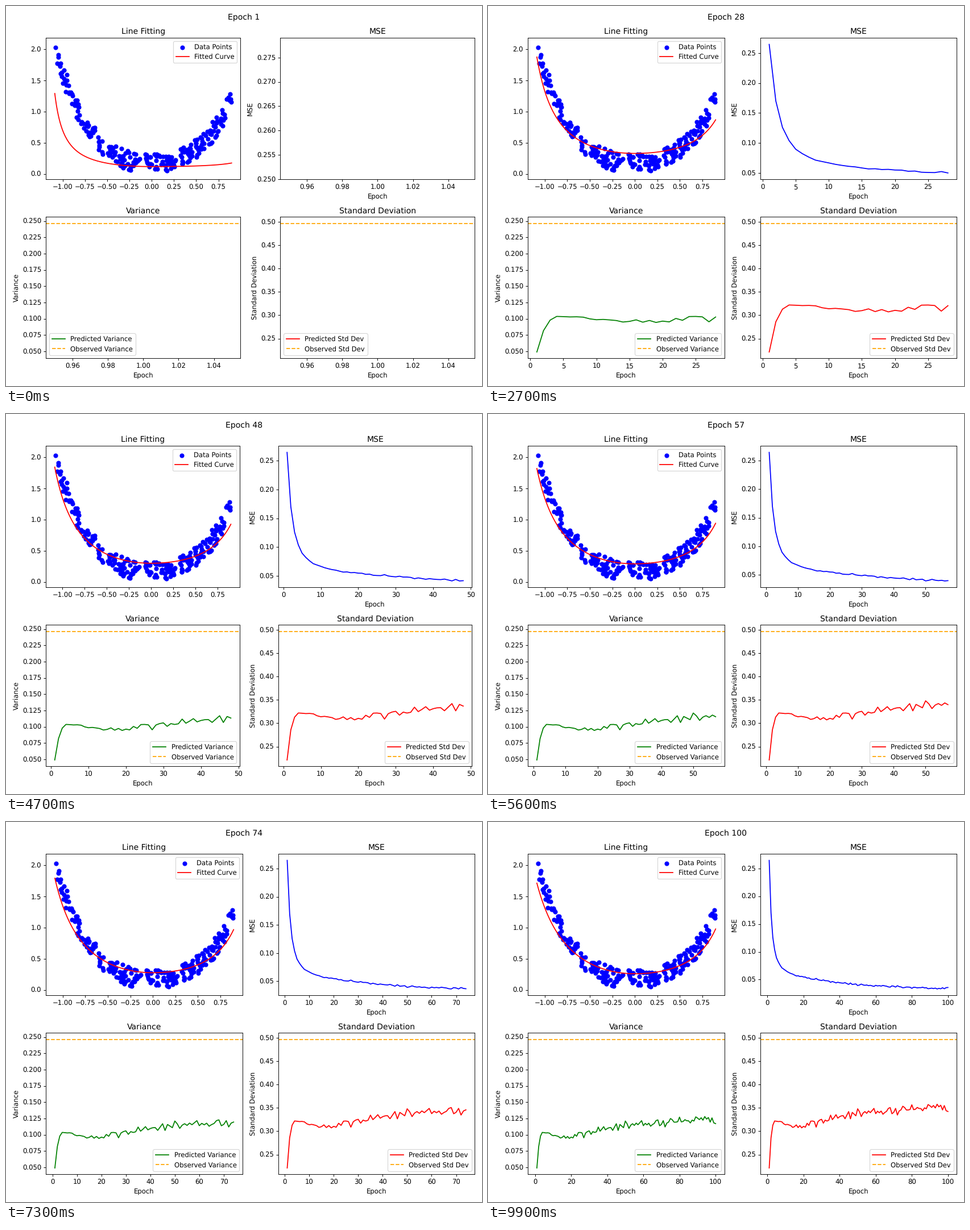
Animation of 837x669 px, one loop 10 s. Source, as a matplotlib script:

```python
import numpy as np
import matplotlib.pyplot as plt
from matplotlib.animation import FuncAnimation

WIDTH, HEIGHT, DPI = 837, 669, 83.665
EPOCHS = 100
OBS_VAR = 0.2465
X_MIN, X_MAX = -1.088, 0.898

plt.rcParams["text.hinting"] = "none"
rng = np.random.default_rng(7)
epochs = np.arange(1, EPOCHS + 1)


def trend(keys):
    """Values for every epoch, linear in log(epoch) between a few keys."""
    return np.interp(np.log(epochs), np.log(list(keys)), list(keys.values()))


# Spread of the prediction: a quick rise, then a slow climb with growing jitter
std_trend = trend({1: .2215, 2: .286, 3: .313, 4: .322, 7: .321,
                   10: .315, 15: .310, 30: .325, 100: .3535})
jitter = rng.normal(0, .0055, EPOCHS) * np.clip((epochs - 4) / 20, 0, 1)
std = std_trend + jitter
var = std ** 2

# The error decays smoothly and dips whenever the spread rises
mse = np.exp(trend({e: np.log(v) for e, v in {
    1: .2645, 2: .170, 3: .126, 5: .0895, 8: .0715,
    16: .057, 30: .0485, 60: .039, 100: .0337}.items()}))
mse -= 0.27 * (var - std_trend ** 2)

# Fitted curve: a floor and two wings whose heights follow the spread
floor = trend({1: .118, 4: .31, 16: .36, 100: .26})
left = std * trend({1: 5.3, 16: 5.08, 100: 4.25})
right = std * trend({1: .26, 4: 1.2, 16: 1.5, 100: 2.1})
bend = 4.5 - 0.75 * np.log(epochs)
curve_x = np.linspace(X_MIN, X_MAX, 200)


def wing(t, sharpness):
    return t ** 2 / (1 + sharpness * (1 - t ** 2))


def fitted_curve(i):
    return floor[i] + np.where(curve_x < 0,
                               left[i] * wing(curve_x / X_MIN, bend[i]),
                               right[i] * wing(curve_x / X_MAX, 1))


def data_points(count=250):
    x = rng.uniform(X_MIN, X_MAX, count)
    y = 0.17 + 0.75 * x ** 2 + 0.7 * x ** 4 + rng.uniform(-.16, .16, count)
    return x, np.clip(y, 0.017, 2.08)


fig, ((ax_fit, ax_mse), (ax_var, ax_std)) = plt.subplots(
    2, 2, figsize=((WIDTH + .01) / DPI, (HEIGHT + .01) / DPI), dpi=DPI)
suptitle = fig.suptitle("Epoch 1")

ax_fit.scatter(*data_points(), color="blue", label="Data Points")
fit_line, = ax_fit.plot(curve_x, fitted_curve(0), color="red", label="Fitted Curve")
ax_fit.set(title="Line Fitting", ylim=(-0.087, 2.183))
ax_fit.legend(loc="upper right")


def history(ax, title, color, label=None, ylabel=None):
    line, = ax.plot([], [], color=color, label=label)
    ax.set(title=title, xlabel="Epoch", ylabel=ylabel or title)
    return line


def observed(ax, level, label):
    ax.axhline(level, color="orange", linestyle="--", label=label)
    ax.legend(loc="best")


mse_line = history(ax_mse, "MSE", "blue")
var_line = history(ax_var, "Variance", "green", "Predicted Variance")
std_line = history(ax_std, "Standard Deviation", "red", "Predicted Std Dev")
observed(ax_var, OBS_VAR, "Observed Variance")
observed(ax_std, OBS_VAR ** 0.5, "Observed Std Dev")


def update(i):
    suptitle.set_text(f"Epoch {i + 1}")
    fit_line.set_ydata(fitted_curve(i))
    for line, values in ((mse_line, mse), (var_line, var), (std_line, std)):
        line.set_data(epochs[:i + 1], values[:i + 1])
        line.axes.relim()
        line.axes.autoscale_view()
    fig.tight_layout()


anim = FuncAnimation(fig, update, frames=EPOCHS, interval=100,
                     repeat=True, repeat_delay=0)
plt.show()
```
